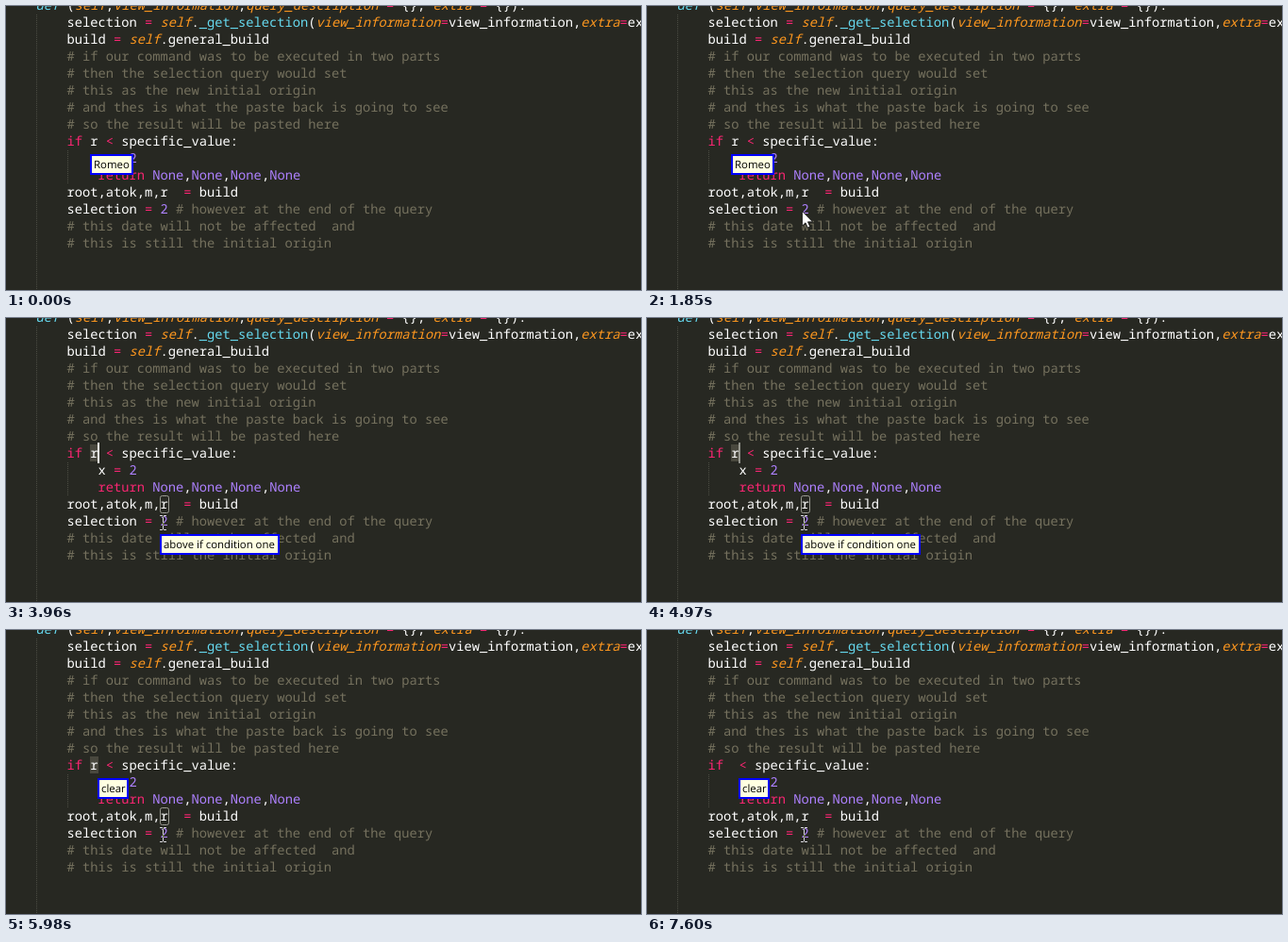
Write an HTML page that moves like this. It is 673 by 301 pixels and loops after 8000 ms.

```html
<!DOCTYPE html>
<html lang="en">
<head>
<meta charset="utf-8">
<title>Editor with voice command tooltips</title>
<style>
  html, body { margin: 0; width: 100%; height: 100%; overflow: hidden; background: #272822; }
  svg { display: block; width: 673px; height: 301px; background: #272822; }
  text { white-space: pre; text-rendering: geometricPrecision; }
  #code text { font: 500 13.75px "Noto Sans Mono", monospace; fill: #fff; }
  #code .k { fill: #f92672; }
  #code .n { fill: #ae81ff; }
  #code .c { fill: #75715e; font-weight: 400; }
  #code .f { fill: #66d9ef; font-weight: 400; }
  #code .d { fill: #66d9ef; font-weight: 400; font-style: italic; }
  #code .p { fill: #fd971f; font-weight: 400; font-style: italic; }
  #tip text { font: 11.4px "Open Sans", "Noto Sans", sans-serif; fill: #000; }
  .guide { stroke: #4b4c43; stroke-dasharray: 1 1; }
  #beam { mix-blend-mode: difference; }
</style>
</head>
<body>
<svg viewBox="0 0 673 301">
  <path class="guide" d="M32.5 9V301M65.5 153V188"/>
  <rect id="sel" x="89" y="134" width="9" height="18" fill="#49483e"/>
  <g id="code"></g>
  <rect id="match" x="163.5" y="188.5" width="9" height="18" rx="2" fill="none" stroke="#9a9a92"/>
  <rect id="caret" width="2" height="22" fill="#f8f8f0"/>
  <g id="tip">
    <rect x="1" y="1" height="20" fill="#ffffe1" stroke="#00f" stroke-width="2"/>
    <text x="4" y="15"></text>
  </g>
  <path id="beam" fill="#fff" d="M-3-8h3v1h1v-1h3v1H1V7H4V8H1V7H0V8H-3V7H0V-7H-3Z"/>
  <g id="wait" fill="none" transform="translate(164 216)">
    <circle r="9" stroke="#fff" stroke-width="6"/>
    <circle r="9" stroke="#333" stroke-width="2" stroke-dasharray="42 15"/>
  </g>
  <path id="arrow" transform="translate(164 217)" fill="#fff" stroke="#111" stroke-width=".8"
        d="M.5.5V16L4 12.8 6.3 18 8.8 17 6.5 11.8H11.5Z"/>
  <g id="busy">
    <rect id="plate" x="163" y="229" width="16" fill="#fff"/>
    <path d="M170 230Q165.5 236 168 240 171 244 175 241 178 236 172 233.5V238"
          fill="none" stroke="#272822" stroke-width="1.6"/>
  </g>
</svg>
<script>
const LOOP = 8000, LEFT = 64.5, CELL = 8.25, ROW = 18;
const $ = id => document.getElementById(id);

// ~k...~ colours a run with class k
const lines = [
  "~ddef~ (~pself~,~pview_information~,~pquery_description~ ~k=~ {}, ~pextra~ ~k=~ {}):",
  "selection ~k=~ ~pself~.~f_get_selection~(~pview_information~~k=~view_information,~pextra~~k=~extra)",
  "build ~k=~ ~pself~.general_build",
  "~c# if our command was to be executed in two parts~",
  "~c# then the selection query would set~",
  "~c# this as the new initial origin~",
  "~c# and thes is what the paste back is going to see~",
  "~c# so the result will be pasted here~",
  "~kif~",
  "    x ~k=~ ~n2~",
  "    ~kreturn~ ~nNone~,~nNone~,~nNone~,~nNone~",
  "root,atok,m,r  ~k=~ build",
  "selection ~k=~ ~n2~ ~c# however at the end of the query~",
  "~c# this date will not be affected  and~",
  "~c# this is still the initial origin~"
];

function svg(tag, attrs, parent) {
  const el = document.createElementNS("http://www.w3.org/2000/svg", tag);
  for (const key in attrs) el.setAttribute(key, attrs[key]);
  return parent.appendChild(el);
}

function addText(markup, row, col) {
  const el = svg("text", { x: LEFT + col * CELL, y: 4 + row * ROW }, $("code"));
  for (const [, cls, run, plain] of markup.matchAll(/~(\w)(.*?)~|([^~]+)/g))
    svg("tspan", cls ? { class: cls } : {}, el).textContent = run || plain;
  return el;
}

lines.forEach((line, row) => addText(line, row, row ? 0 : -4));
const letter = addText("r", 8, 3);
const tail = addText("~k<~ specific_value:", 8, 5);

// time, opacity
const blink = [
  [0, 0], [1240, 1], [1700, .65], [1775, .3], [1850, 0],
  [2250, .25], [2325, .5], [2400, .75], [2550, 1], [2720, .5], [2860, 0],
  [3330, .25], [3410, .5], [3490, .75], [3640, 1],
  [4340, .65], [4420, .3], [4570, 0], [4970, .5], [5120, 1],
  [5430, .85], [5510, .4], [5580, 0], [6050, 1],
  [6380, .65], [6450, .3], [6530, 0], [7070, .5], [7220, 1],
  [7450, .65], [7520, .3], [7600, 0]
];

// time, x, y
const carets = [[0, 163, 204], [3880, 97, 132], [6050, 89, 132]];

// time, text, width, x, y
const phrase = "above if condition one";
const tips = [
  [0, "Romeo", 46, 89, 157], [2250, "Romeo", 46, 163, 229], [2400],
  [3640, phrase, 127, 163, 229], [5430, phrase, 127, 97, 157], [5580],
  [5810, "clear", 33, 97, 157]
];

const at = (table, t) => table.findLast(step => step[0] <= t);
const show = (el, on) => el.setAttribute("visibility", on ? "visible" : "hidden");
const move = (el, x, y) => el.setAttribute("transform", `translate(${x} ${y})`);

function beamPos(t) {
  if (t >= 1010) return [166, 217];
  if (t >= 930) return [167, 218];
  const step = Math.min(8, Math.floor((t - 150) / 78.75));
  const left = (1 - step / 8) ** 1.6;
  return [Math.round(168 + 278 * left), Math.round(219 + 76 * left)];
}

function render(t) {
  const [, cx, cy] = at(carets, t);
  move($("caret"), cx, cy);
  $("caret").setAttribute("opacity", at(blink, t)[1]);

  const [, label, width, x, y] = at(tips, t);
  show($("tip"), label);
  if (label) {
    move($("tip"), x, y);
    $("tip").firstElementChild.setAttribute("width", width - 2);
    $("tip").lastElementChild.textContent = label;
  }

  const picked = t >= 3880 && t < 6050;
  show($("sel"), picked);
  show($("match"), picked);
  show(letter, t < 6050);
  move(tail, t < 6050 ? 0 : -CELL, 0);

  show($("beam"), t >= 150 && t < 1240 || t >= 3880);
  move($("beam"), ...beamPos(t));
  show($("wait"), t >= 1240 && t < 1470);
  show($("arrow"), t >= 1470 && t < 3880);
  show($("busy"), t >= 2720 && t < 3490);
  $("plate").setAttribute("height", t < 3030 ? 12 : 16);
}

const start = performance.now();
function tick() {
  render((performance.now() - start) % LOOP);
  requestAnimationFrame(tick);
}
tick();
</script>
</body>
</html>
```
